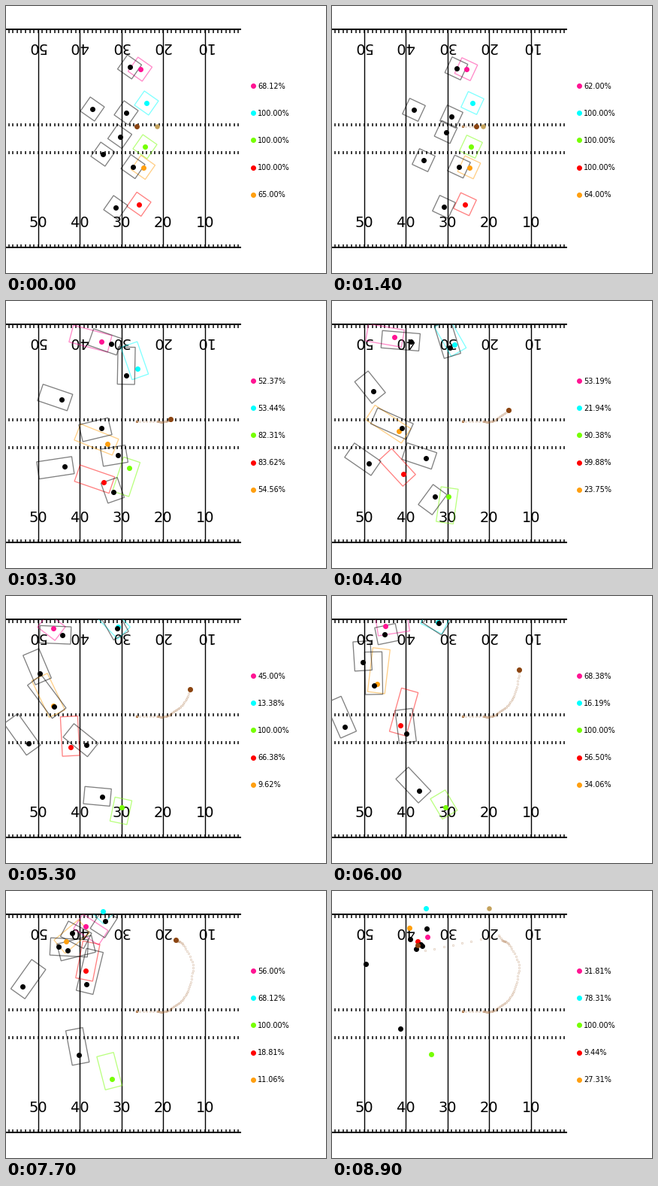
Animation of 426x355 px, one loop 9 s. Source, as a matplotlib script:

```python
import numpy as np
import matplotlib.pyplot as plt
from matplotlib.animation import FuncAnimation
from matplotlib.patches import Polygon, Rectangle

W, H, DPI = 426, 355, 64
PX = 72 / DPI                      # points per pixel
N, STEP = 90, 100
F = np.arange(N)
HIKE, SNAP, THROW = 10, 14, 80     # frames of the play's events
TOP, BOTTOM, RIGHT = 31, 321, 313
REACH, HALF = 8, 11.5              # frames of look-ahead, half box size


def track(times, pts):
    """Hermite path through pts, sampled at every frame."""
    t, p = np.array(times, float), np.array(pts, float)
    h = np.diff(t)
    s = np.diff(p, axis=0) / h[:, None]
    m = np.vstack([s[:1], s])
    for i in range(1, len(t) - 1):
        a, b = s[i - 1], s[i]
        if t[i] <= SNAP:           # no overshoot while standing
            m[i] = np.where(a * b > 0, 2 * a * b / (a + b + 1e-9), 0)
        else:
            m[i] = (a * h[i] + b * h[i - 1]) / (h[i] + h[i - 1])
    i = np.clip(np.searchsorted(t, F, "right") - 1, 0, len(t) - 2)
    d = h[i][:, None]
    u = (F - t[i])[:, None] / d
    return (p[i] * (1 + 2 * u) * (1 - u) ** 2 + p[i + 1] * u * u * (3 - 2 * u)
            + d * (m[i] * u * (1 - u) ** 2 + m[i + 1] * u * u * (u - 1)))


class Player:
    """A dot with a box that reaches ahead in proportion to its speed."""

    def __init__(self, color, pos):
        self.color, self.pos = color, pos
        vel = np.gradient(pos, axis=0)
        go = np.clip((F - SNAP) / 6, 0, 1)
        self.ahead = REACH * np.hypot(*vel.T) * go
        run = np.degrees(np.arctan2(vel[:, 1], vel[:, 0]))
        first = run[SNAP + 6]
        stand = 35 - 10 * F / SNAP
        stand += 90 * np.round((first - 25) / 90)   # quarter turn nearest the run
        turn = stand + (first - stand) * go
        angle = np.radians(np.where(go < 1, turn, run))
        self.fwd = np.column_stack([np.cos(angle), np.sin(angle)])
        self.side = np.column_stack([-np.sin(angle), np.cos(angle)])

    def place(self, k, u, v):
        """Point of the box at u (back to front) and v (side to side), 0..1."""
        along = -HALF + u * (2 * HALF + self.ahead[k])
        across = (2 * v - 1) * HALF
        return (self.pos[k] + np.multiply.outer(along, self.fwd[k])
                + np.multiply.outer(across, self.side[k]))

    def box(self, k):
        return self.place(k, np.array([0, 1, 1, 0]), np.array([0, 0, 1, 1]))

    def covers(self, k, pts):
        rel = pts - self.pos[k]
        along, across = rel @ self.fwd[k], rel @ self.side[k]
        return ((along >= -HALF) & (along <= HALF + self.ahead[k])
                & (abs(across) <= HALF))


def receiver(color, start, *route):
    keys = [0, SNAP, 33, 44, 53, 67, N - 1]
    return Player(color, track(keys, [start, start, *route]))


def defender(*pts, man=None):
    """Runs through pts, which are gaps to the man if one is marked."""
    pos = track([0, SNAP, 44, 67, N - 1], pts)
    return Player("black", pos + man.pos if man else pos)


pink = receiver("#ff1493", (178.5, 84), (127, 54), (83, 48), (63, 43), (88, 39), (127, 61))
cyan = receiver("#00ffff", (187, 129), (175, 90), (163, 58), (149, 41), (135, 32), (125, 23))
green = receiver("#76ff00", (185, 187), (164, 222), (155, 260), (154, 281), (147, 272), (132, 217))
red = receiver("#ff0000", (177, 263.5), (130, 241), (95, 230), (86, 201), (99, 142), (114, 67))
orange = receiver("#ff9f0f", (182.5, 214.5), (135, 190), (89, 173), (63, 146), (66, 89), (103, 49))
receivers = [pink, cyan, green, red, orange]
defenders = [
    defender((-14, -3), (-13, -1), (22, 6), (-11, 12), (-23, 3), man=pink),
    defender((-27, 13), (-28, 18), (-6, 4), (3, 3), (1, 27), man=cyan),
    defender((-39, 81), (-36, 80), (-18, 0), (-42, -28), (-41, -34), man=green),
    defender((-8, -50), (-8, -50), (30, -21), (1, 20), (6, 6), man=red),
    defender((-31, -41), (-31, -47), (4, -4), (-6, 5), (15, 22), man=orange),
    defender((115, 137), (109, 138), (55, 120), (45, 77), (112, 77)),
    defender((129, 197), (122, 205), (49, 216), (12, 153), (45, 97)),
]
players = receivers + defenders

passer = track([0, SNAP, 33, 53, 60, 67, THROW, N - 1],
               [(201, 160), (201, 160), (219, 157), (245, 124), (248.5, 98),
                (237.5, 74), (222, 59), (209, 23)])

# ball: hiked to the passer, carried, thrown, caught
spot, aim = np.array([173.5, 159.5]), np.array([112, 82])
hike = np.clip((F - HIKE) / 6, 0, 1)[:, None]
air = np.clip((F - THROW) / (N - 1 - THROW), 0, 1)[:, None]
carry = spot + hike * (passer - spot)
ball = np.where(air > 0, carry[THROW] + air * (aim - carry[THROW]), carry)
ball[-1] = red.pos[-1] + (0, 5)

GRID = [g.ravel() for g in np.meshgrid(*[(np.arange(40) + 0.5) / 40] * 2)]


def openness(r, k):
    """Share of a receiver's box that no defender covers, in percent."""
    pts = r.place(k, *GRID)
    covered = np.any([d.covers(k, pts) for d in defenders], axis=0)
    return 100 * (1 - covered.mean())


plt.rcParams["font.family"] = "DejaVu Sans"
fig = plt.figure(figsize=(W / DPI, H / DPI), dpi=DPI, facecolor="white")
ax = fig.add_axes([0, 0, 1, 1])
ax.set(xlim=(0, W), ylim=(H, 0))
ax.axis("off")


def yard_x(yard):
    return 320.4 - 5.555 * yard


def dot(color, size=7, z=5):
    return ax.plot([], [], "o", color=color, ms=size * PX, mew=0, zorder=z)[0]


# field
ax.hlines([TOP, BOTTOM], 0, RIGHT, color="black", lw=2 * PX, zorder=2)
ticks = yard_x(np.arange(2, 58))
for y0, y1 in [(TOP, 35.5), (155.5, 160), (192.5, 197), (316.5, BOTTOM)]:
    ax.vlines(ticks, y0, y1, color="black", lw=1.5 * PX, zorder=2)
for yard in range(10, 51, 10):
    x = yard_x(yard)
    ax.vlines(x, TOP, BOTTOM, color="black", lw=1.4 * PX, zorder=2)
    style = dict(size=19.44 * PX, ha="center", va="baseline",
                 rotation_mode="anchor", zorder=2)
    ax.text(x, 294.3, str(yard), **style)
    ax.text(x - 1.5, 48.6, str(yard), rotation=180, **style)

# legend
labels = []
for i, r in enumerate(receivers):
    y = 106 + 36.2 * i
    dot(r.color).set_data([329.2], [y])
    labels.append(ax.text(335.3, y + 3.5, "", size=9.72 * PX, va="baseline"))

# moving parts
field = Rectangle((0, TOP), RIGHT, BOTTOM - TOP, transform=ax.transData)
boxes, dots = [], []
for i, p in enumerate(players):
    box = Polygon(np.zeros((4, 2)), fill=False, ec=p.color, alpha=0.5,
                  lw=1.3 * PX, zorder=3)
    ax.add_patch(box)
    box.set_clip_path(field)
    boxes.append(box)
    dots.append(dot(p.color, z=5 + 0.1 * i))
trail, = ax.plot([], [], "o", ms=2.4 * PX, mfc="none", mec="#a0622d",
                 mew=0.6 * PX, alpha=0.4, zorder=4)
passer_dot = dot("#c4a25c", 6.5, 7)
ball_dot = dot("#8b4513", 7, 8)


def move(d, path, k):
    d.set_data(path[k, :1], path[k, 1:])


def update(k):
    for p, box, d in zip(players, boxes, dots):
        box.set_xy(p.box(k))
        box.set_visible(k <= THROW)
        move(d, p.pos, k)
    for label, r in zip(labels, receivers):
        label.set_text(f"{openness(r, min(k, THROW)):.2f}%")
    trail.set_data(*ball[:k + 1].T)
    move(passer_dot, passer, k)
    move(ball_dot, ball, k)
    return []


anim = FuncAnimation(fig, update, frames=N, interval=STEP, repeat=True,
                     repeat_delay=0, blit=False)
plt.show()
```
